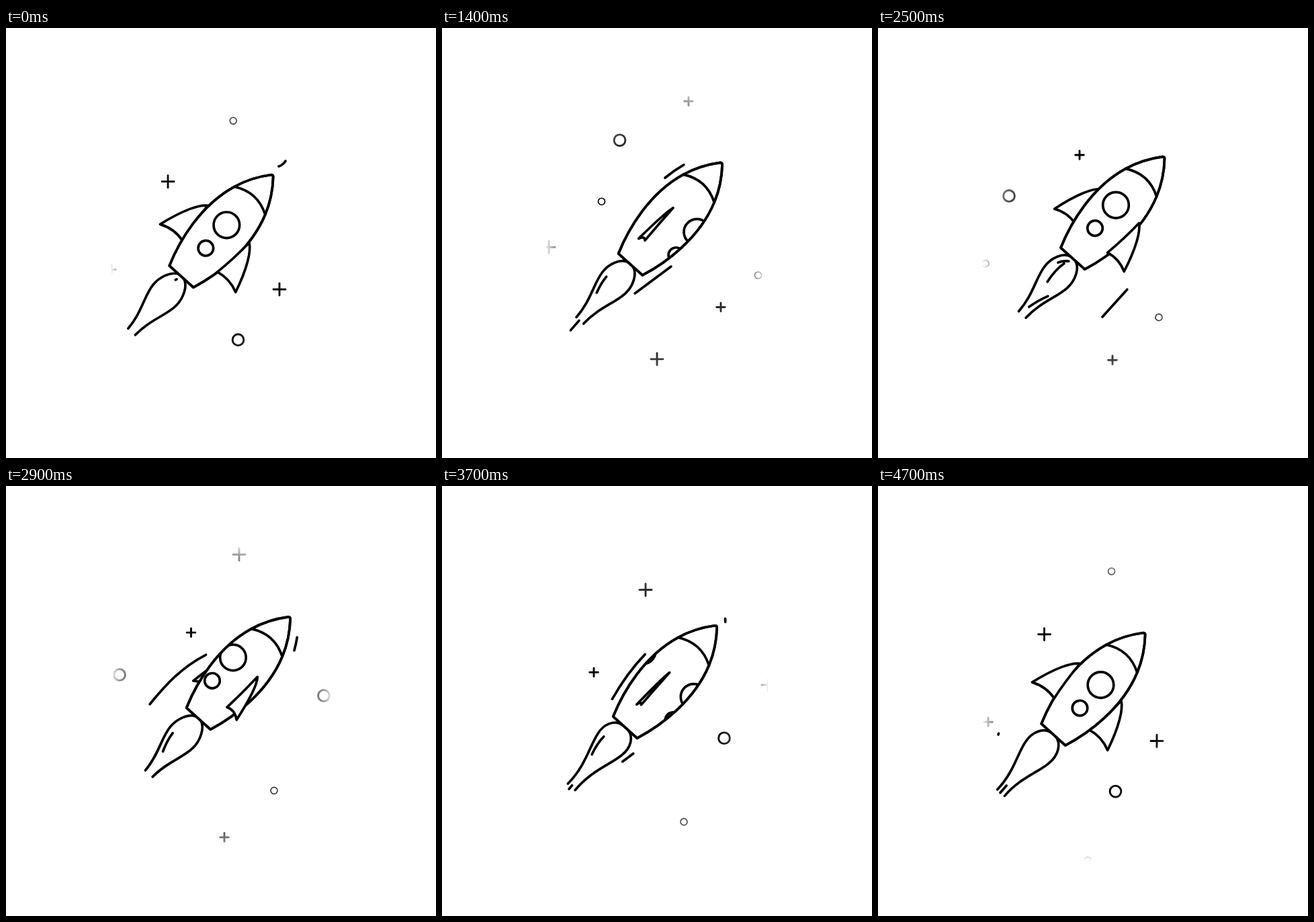
These frames come from a looping animation (640 by 640 pixels, 4800 ms). An HTML page:

```html
<!DOCTYPE html>
<html lang="en">
<head>
<meta charset="utf-8">
<title>Rocket</title>
<style>
  html, body { margin: 0; width: 100%; height: 100%; overflow: hidden; background: #fff; }
  svg { display: block; width: 100%; height: 100%; }
</style>
</head>
<body>
<svg viewBox="0 0 640 640" fill="none" stroke="#000" stroke-width="3.7" stroke-linecap="round" stroke-linejoin="round">
  <defs>
    <radialGradient id="fade">
      <stop offset=".58" stop-color="#fff"/>
      <stop offset=".8" stop-color="#fff" stop-opacity=".68"/>
      <stop offset=".92" stop-color="#fff" stop-opacity=".42"/>
      <stop offset="1" stop-color="#fff" stop-opacity=".05"/>
    </radialGradient>
    <mask id="sky" maskUnits="userSpaceOnUse" x="0" y="0" width="640" height="640">
      <ellipse cx="320" cy="320" rx="166" ry="238" fill="url(#fade)" stroke="none"/>
    </mask>
    <path id="hull" d="M-24 0C-38 -38 -50 -98 -31 -152C-25 -169 -14 -188 -2 -202Q0 -204 2 -202C14 -188 25 -169 31 -152C50 -98 38 -38 24 0Z"/>
    <clipPath id="inside"><use href="#hull"/></clipPath>
  </defs>
  <g mask="url(#sky)"><g id="particles"></g></g>
  <g id="ship">
    <g transform="translate(261 370) rotate(42)">
      <path id="backFin" fill="#fff"/>
      <path id="flame" fill="#fff"/>
      <use href="#hull" fill="#fff"/>
      <g clip-path="url(#inside)"><g id="windows"></g></g>
      <use href="#hull"/>
      <path d="M-31 -152Q0 -170 31 -152"/>
      <path id="frontFin" fill="#fff"/>
    </g>
    <g id="streaks"></g>
  </g>
</svg>
<script>
const LOOP = 4800, TURN = 2400, STEP = 100;
const $ = id => document.getElementById(id);
const mod = (a, n) => ((a % n) + n) % n;
const mix = (a, b, k) => a + (b - a) * k;

function add(parent, tag, attrs) {
  const el = document.createElementNS('http://www.w3.org/2000/svg', tag);
  for (const name in attrs) el.setAttribute(name, attrs[name]);
  return parent.appendChild(el);
}

// Particles slide down-left along parallel lines; keys are [time, x].
const plus = h => ['path', { d: `M${-h} 0H${h}M0 ${-h}V${h}`, 'stroke-width': 2.9 }];
const ring = (r, w) => ['circle', { r, 'stroke-width': w }];
const bigPlus = plus(9), smallPlus = plus(6.3);
const bigRing = ring(8.4, 2.9), smallRing = ring(5, 1.7);

const particles = [
  [bigRing, 105, [[600, 316.5], [1400, 264.5], [2500, 195], [2900, 169]]],
  [bigRing, 312, [[2900, 473], [3700, 420], [4700, 353.5], [4800, 345.5], [5400, 305]]],
  [bigPlus, 102, [[2900, 347], [3700, 303], [4700, 247.5], [4800, 241], [5400, 205.5], [6200, 159]]],
  [bigPlus, 296, [[3700, 485], [4700, 415], [4800, 407], [5400, 370], [6200, 320]]],
  [smallPlus, 109, [[1400, 367], [2500, 300], [2900, 275.5], [3700, 226], [4700, 164], [4800, 157]]],
  [smallPlus, 357, [[600, 464], [1400, 415], [2500, 349], [2900, 325]]],
  [smallRing, 127, [[4700, 347.5], [4800, 338.2], [5400, 295], [6200, 237.5], [7300, 160]]],
  [smallRing, 368, [[1400, 470.5], [2500, 418], [2900, 399], [3700, 360], [4700, 312]]],
].map(([shape, y, keys]) => ({ el: add($('particles'), ...shape), y, keys }));

function placeParticle({ el, y, keys }, t) {
  const begin = keys[0][0] - 800;
  const time = begin + mod(t - begin, LOOP);
  let i = 0;
  while (i < keys.length - 2 && time > keys[i + 1][0]) i++;
  const [t0, x0] = keys[i], [t1, x1] = keys[i + 1];
  const x = mix(x0, x1, (time - t0) / (t1 - t0));
  el.setAttribute('transform', `translate(${x} ${y - 1.193 * (x - keys[0][1])})`);
}

// Streaks are dashes running along guide paths: [guide, start, speed, length].
const guides = {
  left: 'M416 198Q412 204 406 206C380 207 360 211 340 222C300 245 265 285 239 333',
  leftFin: 'M272 275C235 294 212 320 189 348Q183 357 179 370',
  right: 'M410 208C413 290 375 335 323 372L257 421',
  rightFin: 'M342 416L305 457',
  core: 'M254 374Q238 382 223 405',
  rim: 'M232 381Q217 395 208 419',
  tail: 'M205 430L172 468',
  tailSide: 'M224 426Q210 432 196 442',
  top: 'M255 374Q246 373 239 376',
  topSide: 'M258 381L257 393',
};
const streaks = [
  ['left', 4755, .29, 80], ['left', 1003, .29, 34], ['left', 2915, .29, 83],
  ['leftFin', 2514, .29, 112], ['leftFin', 4031, .29, 60],
  ['right', 667, .36, 67], ['right', 2674, .27, 20], ['right', 3686, .36, 40],
  ['rightFin', 2310, .29, 55],
  ['core', 4790, .2, 20], ['core', 367, .15, 31], ['core', 2207, .15, 37],
  ['rim', 1147, .15, 28], ['rim', 2600, .15, 31], ['rim', 3460, .15, 32],
  ['tail', 490, .3, 25], ['tail', 1213, .3, 25], ['tail', 3560, .3, 7], ['tail', 4583, .3, 14],
  ['tailSide', 2335, .2, 33], ['top', 2415, .2, 17], ['topSide', 540, .2, 12],
].map(([guide, start, speed, length]) => {
  const el = add($('streaks'), 'path', { d: guides[guide] });
  return { el, start, speed, length, total: el.getTotalLength() };
});

function placeStreak({ el, start, speed, length, total }, t) {
  const head = mod(t - start, LOOP) * speed;
  const from = Math.max(0, head - length), to = Math.min(total, head);
  el.style.display = to > from ? '' : 'none';
  el.setAttribute('stroke-dasharray', `${Math.max(.01, to - from)} 9999`);
  el.setAttribute('stroke-dashoffset', -from);
}

const WINDOW_GAP = 102;
for (const x of [0, WINDOW_GAP]) {
  add($('windows'), 'circle', { cx: x, cy: -102, r: 19.3 });
  add($('windows'), 'circle', { cx: x, cy: -55.7, r: 11.3 });
}

// A fin seen at turn q: 1 is fully right, -1 fully left.
function finPath(q) {
  const p = (x, y) => `${x * q} ${y} `;
  return 'M' + p(41.5, -105) + 'C' + p(52, -98) + p(65, -75) + p(76, -36.7) +
    'Q' + p(56, -46) + p(35.5, -41) + 'Q' + p(40.5, -73) + p(41.5, -105) + 'Z';
}

function flamePath(t) {
  const k = .5 - .5 * Math.cos(2 * Math.PI * (t - 30) / 480);
  const end = mix(110, 121.5, k);
  const side = s => {
    const p = (x0, y0, x1, y1) => `${s * mix(x0, x1, k)} ${mix(y0, y1, k)} `;
    return `M${s * 5} 0C` + p(16, 4, 20, 1) + p(24, 22, 28, 16) + p(23, 38, 24, 34) +
      'C' + p(22, 58, 20, 56) + p(8, 80, 5, 82) + `${s * 7.2} ${end}`;
  };
  return side(-1) + side(1);
}

function draw(t) {
  const lift = 1 - Math.cos(2 * Math.PI * (t + 60) / LOOP);
  $('ship').setAttribute('transform', `translate(${14.6 * lift} ${-13.6 * lift})`);

  const phase = Math.PI * mod(t + 50, TURN) / TURN;
  const q = .672 * Math.asin(.998 * Math.cos(phase));
  $('frontFin').setAttribute('d', finPath(q));
  $('backFin').setAttribute('d', finPath(-q));

  const slide = -1.3 - WINDOW_GAP * mod(t, TURN) / TURN;
  $('windows').setAttribute('transform', `translate(${slide} 0)`);
  $('flame').setAttribute('d', flamePath(t));

  particles.forEach(p => placeParticle(p, t));
  streaks.forEach(s => placeStreak(s, t));
}

const started = performance.now();
function tick() {
  const elapsed = performance.now() - started;
  draw(Math.floor(elapsed / STEP) * STEP % LOOP);
  requestAnimationFrame(tick);
}
tick();
</script>
</body>
</html>
```
